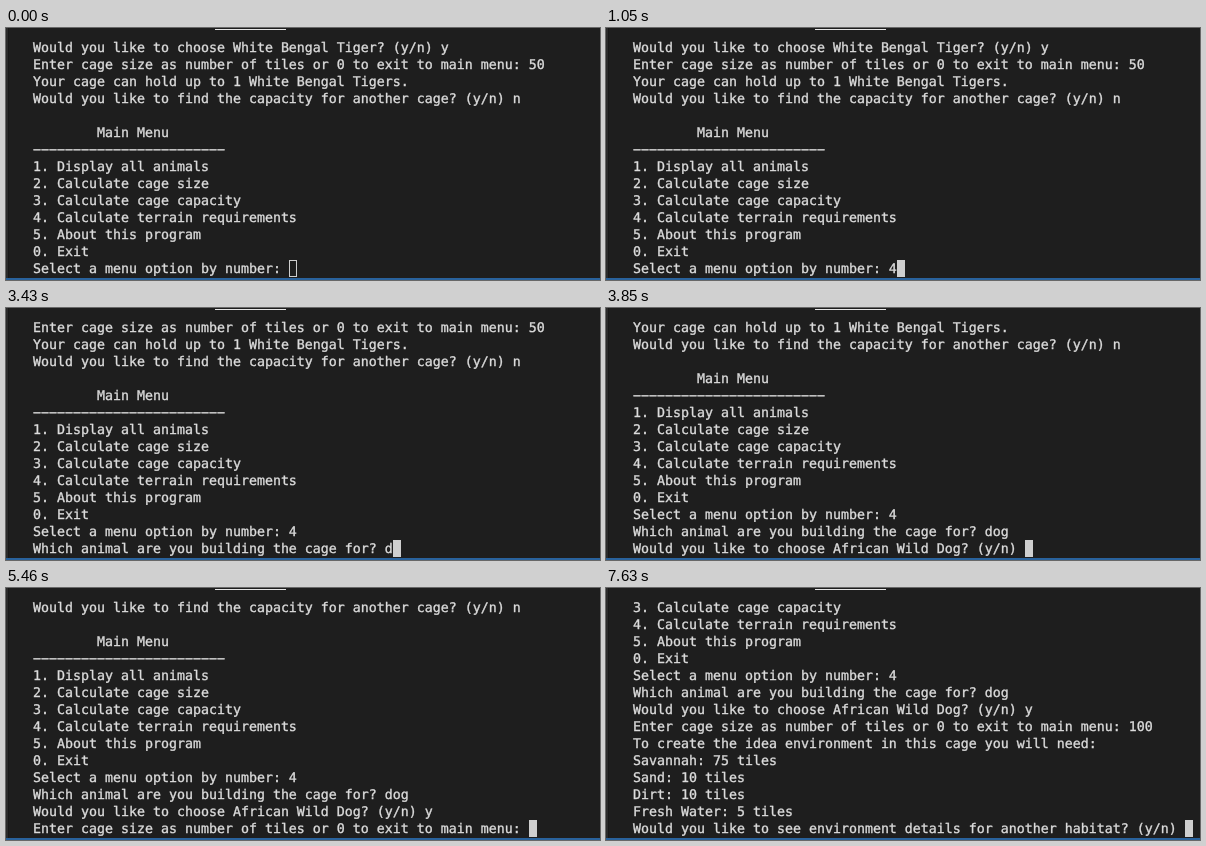
Recreate the animation shown at these times as an HTML page. Size 594x252 px, loop 8000 ms.

```html
<!DOCTYPE html>
<html lang="en">
<head>
<meta charset="utf-8">
<style>
  html, body { margin: 0; width: 594px; height: 252px; overflow: hidden; background: #1e1e1e; }
  body { position: relative; }
  div, pre { position: absolute; margin: 0; box-sizing: border-box; }
  pre {
    left: 27px; top: 12px; color: #dcdcdc;
    font: 13.29px/17px "DejaVu Sans Mono", monospace;
    -webkit-text-stroke: 0.35px #dcdcdc;
    text-rendering: geometricPrecision;
  }
  #cursor { width: 8px; height: 17px; top: 232px; border: 1px solid #cfcfcf; }
  #cursor.on { background: #cfcfcf; }
  #tab { left: 209px; top: 1px; width: 71px; height: 1px; background: #e7e7e7; }
  #edge { left: 0; top: 0; width: 3px; height: 252px; background: #2b2b2b; border-right: 1px solid #191919; }
  #status { left: 0; top: 250px; width: 594px; height: 2px; background: #29629c; }
</style>
</head>
<body>
<div id="edge"></div>
<div id="tab"></div>
<pre id="screen"></pre>
<div id="cursor"></div>
<div id="status"></div>
<script>
const LOOP = 8000, ROWS = 14, COL = 8, LEFT = 27, FOCUS = 770;

// Terminal output and keystrokes: [time in ms, text appended]
const log = [
  [0, `Would you like to choose White Bengal Tiger? (y/n) y
Enter cage size as number of tiles or 0 to exit to main menu: 50
Your cage can hold up to 1 White Bengal Tigers.
Would you like to find the capacity for another cage? (y/n) n

        Main Menu
${"\u2212".repeat(24)}
1. Display all animals
2. Calculate cage size
3. Calculate cage capacity
4. Calculate terrain requirements
5. About this program
0. Exit
Select a menu option by number: `],
  [980, "4"],
  [1680, "\nWhich animal are you building the cage for? "],
  [3430, "d"], [3500, "o"], [3640, "g"],
  [3850, "\nWould you like to choose African Wild Dog? (y/n) "],
  [4970, "y"],
  [5460, "\nEnter cage size as number of tiles or 0 to exit to main menu: "],
  [6510, "1"], [6860, "0"], [7000, "0"],
  [7630, `
To create the idea environment in this cage you will need:
Savannah: 75 tiles
Sand: 10 tiles
Dirt: 10 tiles
Fresh Water: 5 tiles
Would you like to see environment details for another habitat? (y/n) `]
];

const screenEl = document.getElementById("screen");
const cursorEl = document.getElementById("cursor");
const start = performance.now();

function draw() {
  const t = Math.max(0, performance.now() - start) % LOOP;
  const text = log.filter(([at]) => at <= t).map(([, s]) => s).join("");
  const lines = text.split("\n").slice(-ROWS);
  const shown = lines.join("\n");
  if (screenEl.textContent !== shown) screenEl.textContent = shown;
  cursorEl.style.left = LEFT + COL * lines[ROWS - 1].length + "px";
  cursorEl.classList.toggle("on", t >= FOCUS);
  requestAnimationFrame(draw);
}
draw();
</script>
</body>
</html>
```
